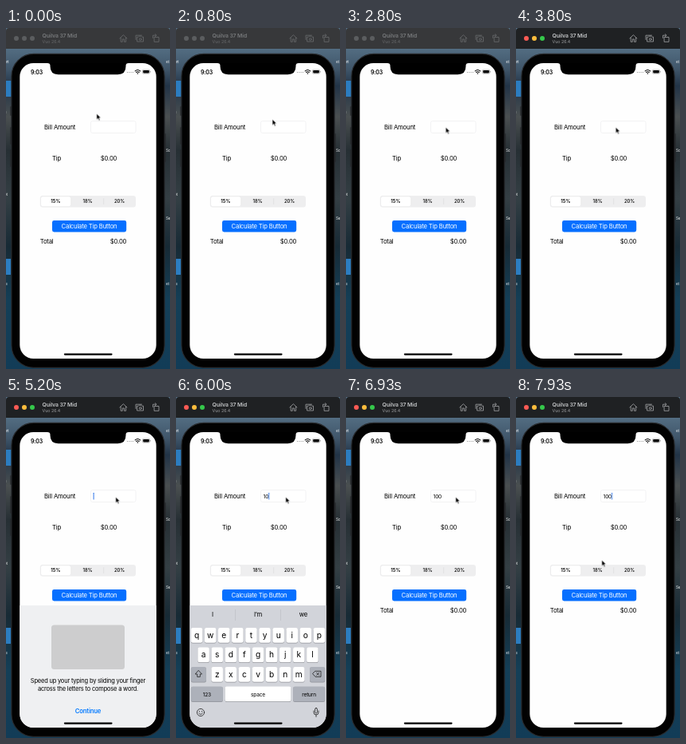
These frames come from a looping animation (206x427 px, 8 s). An HTML page:

```html
<!DOCTYPE html>
<html lang="en">
<head>
<meta charset="utf-8">
<title>Tip calculator</title>
<style>
html, body { margin: 0; width: 100%; height: 100%; overflow: hidden; background: #12344a; }
svg { display: block; width: 100%; height: 100%; }
text { font: 7.75px Inter, "Open Sans", sans-serif; letter-spacing: -.2px; }
.mid { text-anchor: middle; }
.segment { font-size: 5.9px; font-weight: 500; letter-spacing: 0; }
.key { font-size: 10.2px; letter-spacing: 0; }
.small { font-size: 6.6px; }
.hint { font-size: 7.5px; }
.link { fill: #087cff; font-weight: 600; }
.desk { font-size: 4.5px; fill: #fff; }
.line { fill: none; stroke: currentColor; stroke-width: .8; stroke-linejoin: round; stroke-linecap: round; }

/* One loop is 8000 ms, so 1% is 80 ms. */
.anim { animation: 8s linear infinite; }
.bar { animation-name: bar; fill: #37383a; }
.chrome { animation-name: chrome; color: #77797b; fill: currentColor; }
.lamp { animation-name: lamp; fill: #5b5d5f; }
.pointer { animation-name: pointer; }
.panel { animation-name: panel; transform: translateY(153px); }
.intro { animation-name: intro; }
.keyboard { animation-name: keyboard; }
.caret { animation-name: blink; }
.caret rect { animation-name: advance; }
.d1 { animation-name: digit1; }
.d2 { animation-name: digit2; }
.d3 { animation-name: digit3; }

@keyframes bar { 0%, 39.99% { fill: #37383a } 40%, 100% { fill: #1f2123 } }
@keyframes chrome { 0%, 39.99% { color: #77797b } 40%, 100% { color: #c4c6c8 } }
@keyframes lamp { 0%, 39.99% { fill: #5b5d5f } 40%, 100% { fill: var(--lit) } }
@keyframes pointer {
  0% { transform: translate(113.8px, 107.3px) }
  10% { transform: translate(121px, 114.3px) }
  18%, 54% { transform: translate(125.3px, 124.3px); animation-timing-function: ease-in-out }
  59%, 89% { transform: translate(137.7px, 125.2px); animation-timing-function: ease-in-out }
  98.5%, 100% { transform: translate(107.7px, 204.2px) }
}
@keyframes panel {
  0%, 50% { transform: translateY(153px); animation-timing-function: cubic-bezier(.33, 0, .67, 1) }
  55%, 80.6% { transform: none; animation-timing-function: cubic-bezier(.33, 0, .67, 1) }
  85.6%, 100% { transform: translateY(153px) }
}
@keyframes intro { 0%, 71.24% { opacity: 1 } 71.25%, 100% { opacity: 0 } }
@keyframes keyboard { 0%, 71.24% { opacity: 0 } 71.25%, 100% { opacity: 1 } }
@keyframes digit1 { 0%, 71.99% { opacity: 0 } 72%, 100% { opacity: 1 } }
@keyframes digit2 { 0%, 74.49% { opacity: 0 } 74.5%, 100% { opacity: 1 } }
@keyframes digit3 { 0%, 76.99% { opacity: 0 } 77%, 100% { opacity: 1 } }
@keyframes blink {
  0%, 50.99% { opacity: 0 } 51%, 57% { opacity: 1 }
  58.5%, 62% { opacity: 0 } 63.5%, 84% { opacity: 1 }
  85.5%, 89% { opacity: 0 } 90.5%, 100% { opacity: 1 }
}
@keyframes advance {
  0%, 71.99% { transform: none } 72%, 74.49% { transform: translateX(2.6px) }
  74.5%, 76.99% { transform: translateX(6.5px) } 77%, 100% { transform: translateX(10.4px) }
}
</style>
</head>
<body>
<svg viewBox="0 0 206 427" preserveAspectRatio="none">
  <defs>
    <linearGradient id="wall" x2="0" y2="1">
      <stop offset=".06" stop-color="#536d82"/>
      <stop offset=".12" stop-color="#40566a"/>
      <stop offset=".17" stop-color="#223447"/>
      <stop offset=".26" stop-color="#4a4f50"/>
      <stop offset=".36" stop-color="#262f34"/>
      <stop offset=".5" stop-color="#343f44"/>
      <stop offset=".64" stop-color="#172a35"/>
      <stop offset=".8" stop-color="#143f57"/>
      <stop offset="1" stop-color="#123c57"/>
    </linearGradient>
    <clipPath id="screen"><rect x="17.3" y="44" width="171.4" height="370" rx="17"/></clipPath>
  </defs>

  <rect width="206" height="427" fill="url(#wall)"/>
  <g fill="#2c7dc0">
    <rect y="66" width="7" height="20"/>
    <rect y="289" width="6" height="20"/>
  </g>
  <g>
    <text class="desk" x="-2" y="44">urt</text>
    <text class="desk" x="-2" y="107">e</text>
    <text class="desk" x="-2" y="210">ot</text>
    <text class="desk" x="-2" y="322">te</text>
    <text class="desk" x="201" y="44">et</text>
    <text class="desk" x="201" y="155">Sc</text>
    <text class="desk" x="201" y="240">Se</text>
    <text class="desk" x="201" y="322">et</text>
  </g>

  <rect class="anim bar" width="206" height="26" rx="4"/>
  <rect class="anim bar" y="10" width="206" height="16"/>
  <g id="lamps"></g>
  <g class="anim chrome">
    <text x="45.5" y="12.2" style="font-size:6.8px;font-weight:600;letter-spacing:-.1px">Quilva 37 Mid</text>
    <text x="45.5" y="19.2" style="font-size:5.3px;letter-spacing:0" opacity=".75">Vuo 26.4</text>
    <g class="line" opacity=".8">
      <path d="M142.8 13 147.4 8.7 152 13M144.2 12.3V17.3H146.3V14H148.5V17.3H150.6V12.3"/>
      <path d="M163 14.5V9.2H170.5M165 11.2H166.5L167.5 10.2H169.5L170.5 11.2H172.5V17H165Z"/>
      <circle cx="168.7" cy="14.1" r="1.4"/>
      <path d="M186.5 11.5H192V17.3H186.5ZM184.6 12.5V9.2H188.8M187.4 7.7 188.9 9.2 187.4 10.7"/>
    </g>
  </g>

  <g fill="#242527">
    <rect x="5.4" y="98" width="2" height="12" rx="1"/>
    <rect x="5.4" y="124" width="2" height="22" rx="1"/>
    <rect x="5.4" y="152" width="2" height="22" rx="1"/>
    <rect x="198.6" y="132" width="2" height="36" rx="1"/>
  </g>
  <rect x="6.9" y="32.4" width="192.2" height="393" rx="28" fill="#020202" stroke="#292b2e" stroke-width="1.2"/>

  <g clip-path="url(#screen)">
    <rect x="17" y="44" width="172" height="371" fill="#fefefe"/>
    <path d="M52 44Q55.5 44 55.5 47V48Q55.5 58.2 65.5 58.2H140.5Q150.5 58.2 150.5 48V47Q150.5 44 154 44Z"/>
    <text x="31" y="57.5" style="font-size:7px;font-weight:600">9:03</text>
    <g fill="#888">
      <circle cx="152.5" cy="55.5" r=".6"/><circle cx="154.8" cy="55.5" r=".6"/>
      <circle cx="157.1" cy="55.5" r=".6"/><circle cx="159.4" cy="55.5" r=".6"/>
    </g>
    <path class="line" style="stroke-width:1.1" d="M162.2 53.9Q165.4 51 168.6 53.9M163.6 55.5Q165.4 54 167.2 55.5"/>
    <circle cx="165.4" cy="57" r=".8"/>
    <rect x="171.4" y="52.2" width="9.2" height="5" rx="1.4" fill="none" stroke="#888" stroke-width=".5"/>
    <rect x="172.2" y="53" width="7.6" height="3.4" rx=".8"/>
    <rect x="181.2" y="53.9" width=".7" height="1.7" rx=".3" fill="#888"/>

    <text x="48" y="127.4">Bill Amount</text>
    <rect x="106.5" y="116.5" width="56.5" height="15" rx="2.3" fill="#fff" stroke="#ebebed" stroke-width=".6"/>
    <g id="digits"></g>
    <g class="anim caret" fill="#2f76e8"><rect class="anim" x="109.6" y="119.8" width="1" height="8.6" rx=".5"/></g>
    <text x="58" y="166.3">Tip</text>
    <text x="118.8" y="166.3">$0.00</text>

    <rect x="42.8" y="210" width="120.2" height="14.4" rx="3.2" fill="#eeeeef"/>
    <rect x="43.5" y="210.7" width="38.2" height="13" rx="2.8" fill="#fff" stroke="#e0e0e2" stroke-width=".5"/>
    <path d="M122.7 213.3V221" stroke="#d2d2d5" stroke-width=".5"/>
    <g class="mid">
      <text class="segment" x="62.3" y="219.4" style="font-weight:600">15%</text>
      <text class="segment" x="102.5" y="219.4">18%</text>
      <text class="segment" x="142.6" y="219.4">20%</text>
    </g>

    <rect x="58" y="241" width="93.2" height="14.5" rx="2.4" fill="#066fff"/>
    <text class="mid" x="104.5" y="251.1" fill="#fff">Calculate Tip Button</text>
    <text x="42.7" y="269.8">Total</text>
    <text x="130.8" y="269.8">$0.00</text>

    <g class="anim panel">
      <g class="anim intro">
        <rect x="17" y="261" width="172" height="154" fill="#eff0f2"/>
        <rect x="57" y="285.5" width="92" height="55.5" rx="3.5" fill="#cdcdce"/>
        <g class="mid">
          <text class="hint" x="103" y="358">Speed up your typing by sliding your finger</text>
          <text class="hint" x="103" y="367.8">across the letters to compose a word.</text>
          <text class="link" x="103" y="396.4">Continue</text>
        </g>
      </g>
      <g class="anim keyboard">
        <rect x="17" y="261" width="172" height="154" fill="#d2d4da"/>
        <path d="M74.5 266V280M131.5 266V280" stroke="#b5b7bd" stroke-width=".5"/>
        <g id="keys" class="mid"></g>
        <g class="line" color="#222">
          <path d="M28.5 342.6 32.5 347H30.3V350.4H26.7V347H24.5Z"/>
          <path d="M175 343.3H182V350.3H175L171.8 346.8ZM176.7 345.3 179.7 348.3M179.7 345.3 176.7 348.3"/>
          <circle cx="31" cy="395" r="4.6"/>
          <path d="M28.7 396Q31 399 33.3 396M29.4 393.4V394M32.6 393.4V394"/>
          <path d="M173 393V395Q173 398 176 398T179 395V393M176 398V400.5"/>
          <rect x="174.6" y="389.5" width="2.8" height="6.5" rx="1.4"/>
        </g>
      </g>
    </g>
    <rect x="72.8" y="407.4" width="60.8" height="2.3" rx="1.15"/>
  </g>

  <g class="anim pointer">
    <path d="M0 0V7.4L1.8 5.8 2.9 8.5 4.2 7.9 3.1 5.3H5.4Z" stroke="#fff" stroke-width=".6"/>
  </g>
</svg>
<script>
const svgNS = "http://www.w3.org/2000/svg";
function add(parent, tag, attrs, label = "") {
  const node = document.createElementNS(svgNS, tag);
  for (const name in attrs) node.setAttribute(name, attrs[name]);
  node.textContent = label;
  document.getElementById(parent).append(node);
}

function addKey(x, y, width, label, fill = "#fff", style = "key") {
  add("keys", "rect", { x, y: y + .6, width, height: 18.8, rx: 2.2, fill: "#909298" });
  add("keys", "rect", { x, y, width, height: 18.8, rx: 2.2, fill });
  add("keys", "text", { x: x + width / 2, y: y + 12.5, class: style }, label);
}

["#fc5b55", "#fdbd3d", "#35c84b"].forEach((color, i) =>
  add("lamps", "circle", { cx: 13 + i * 10, cy: 13, r: 3, class: "anim lamp", style: `--lit:${color}` }));

[..."100"].forEach((digit, i) =>
  add("digits", "text", { x: [109.4, 112.2, 116.1][i], y: 126.6, class: `small anim d${i + 1}` }, digit));

["I", "I’m", "we"].forEach((word, i) =>
  add("keys", "text", { x: 46 + i * 57, y: 275.2 }, word));

["qwertyuiop", "asdfghjkl", "zxcvbnm"].forEach((letters, row) => {
  const left = 103 - letters.length * 8.55 + 1.3;
  [...letters].forEach((letter, i) => addKey(left + i * 17.1, 289 + row * 24.5, 14.5, letter));
});

const gray = "#adb1ba";
addKey(18.9, 338, 19, "", gray);
addKey(168.1, 338, 19, "", gray);
addKey(18.9, 362.5, 40, "123", gray, "small");
addKey(61.6, 362.5, 82.8, "space", "#fff", "small");
addKey(147.1, 362.5, 40, "return", gray, "small");
</script>
</body>
</html>
```
